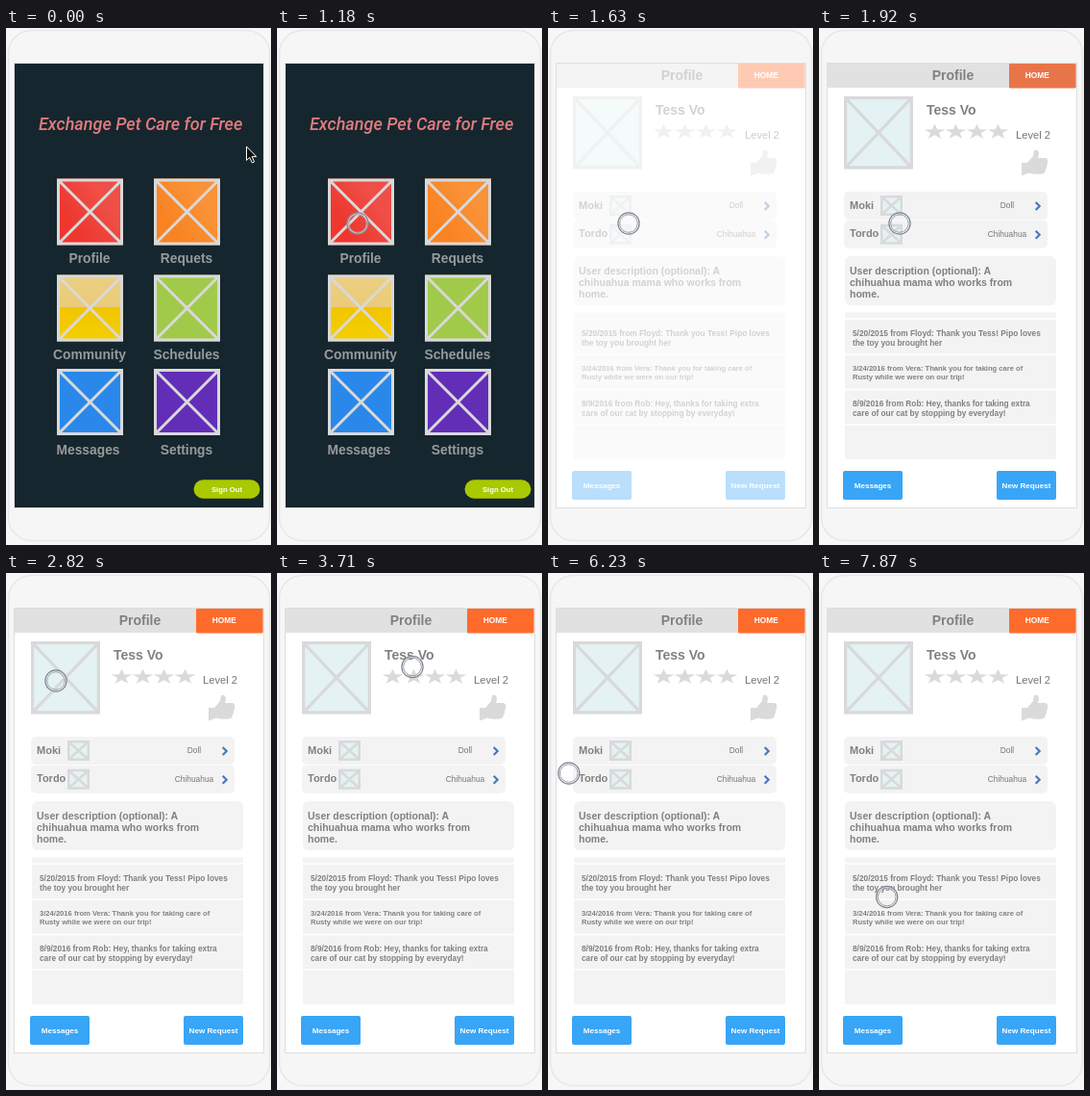
Recreate the animation shown at these times as an HTML page. Size 276 by 537 pixels, loop 8 s.

```html
<!DOCTYPE html>
<html lang="en">
<head>
<meta charset="utf-8">
<title>Pet care prototype</title>
<style>
  html, body { margin: 0; width: 100%; height: 100%; overflow: hidden; background: #f7f7f7; }
  svg { display: block; width: 100%; height: 100%; }
  text { font-family: "Liberation Sans", Arial, sans-serif; }
  .title { font: italic 500 18px Roboto, sans-serif; }
</style>
</head>
<body>
<svg id="stage" viewBox="0 0 276 537" xmlns="http://www.w3.org/2000/svg"></svg>
<script>
const LOOP = 8000, STEPS = 54;
const GREY = '#808080', PALE = '#f3f3f3', LINE = '#d9d9d9', BLUE = '#38a5f7';

const rect = (x, y, w, h, fill, r = 0, extra = '') =>
  `<rect x="${x}" y="${y}" width="${w}" height="${h}" rx="${r}" fill="${fill}" ${extra}/>`;

const label = (x, y, size, str, { fill = GREY, bold = true, anchor = 'start' } = {}) =>
  `<text x="${x}" y="${y}" font-size="${size}" fill="${fill}" text-anchor="${anchor}"
    font-weight="${bold ? 700 : 400}">${str}</text>`;

const centred = (x, y, size, str, fill = GREY, bold = true) =>
  label(x, y, size, str, { fill, bold, anchor: 'middle' });

// Crossed placeholder picture
const placeholder = (x, y, w, h, fill, line = 3) => {
  const i = line / 2;
  return rect(x, y, w, h, fill) +
    `<path d="M${x + i} ${y + i}h${w - line}v${h - line}h${line - w}zl${w - line} ${h - line}
      m0 ${line - h}L${x + i} ${y + h - i}" fill="none" stroke="${LINE}" stroke-width="${line}"/>`;
};

const button = (x, y, w, h, fill, r, str, size) =>
  rect(x, y, w, h, fill, r) + centred(x + w / 2, y + h / 2 + 3, size, str, '#fff');

const star = (cx, cy) => {
  const points = Array.from({ length: 10 }, (_, i) => {
    const a = i * Math.PI / 5, r = i % 2 ? 0.4 : 1;
    return [cx + 11.4 * r * Math.sin(a), cy - 8.3 * r * Math.cos(a)].map(v => v.toFixed(1));
  });
  return `<polygon points="${points.join(' ')}" fill="#dadada"/>`;
};

function homeScreen() {
  const tiles = [
    ['Profile', 'url(#red)'], ['Requets', 'url(#orange)'],
    ['Community', 'url(#sand)'], ['Schedules', '#a1ca4b'],
    ['Messages', '#2a88ea'], ['Settings', '#622eb8'],
  ];
  const rows = [156.5, 256.5, 354];
  return rect(9, 37, 259, 461, '#16262e') +
    `<text class="title" x="34" y="106" fill="#e27b7e">Exchange Pet Care for Free</text>` +
    tiles.map(([name, fill], i) => {
      const x = 53 + i % 2 * 101, y = rows[i >> 1];
      return placeholder(x, y, 69, 69, fill) +
        centred(x + (i === 4 ? 32.5 : 34), y + (i < 4 ? 87.5 : 89), 13.8, name, '#979a9b');
    }).join('') +
    button(195.5, 469.3, 69, 19.4, '#a9c900', 9.7, 'Sign Out', 7.7);
}

function petRow(y, name, breed) {
  return rect(26, y, 212, 29, PALE, 5) +
    label(32, y + 17.5, 11, name) +
    placeholder(64, y + 4, 23, 21, '#e4f2f4', 2.5) +
    centred(196, y + 17, 8.4, breed, '#777', false) +
    `<path d="M225.7 ${y + 11}l4 4l-4 4" fill="none" stroke="#4a78bd" stroke-width="2.2"/>`;
}

function profileScreen() {
  const lines = (x, y, size, gap, ...rows) =>
    rows.map((row, i) => label(x, y + i * gap, size, row)).join('');
  return rect(9, 37, 259, 461, '#fff') +
    rect(9, 37, 259, 25, '#e1e1e1') +
    centred(139.5, 54, 14, 'Profile') +
    rect(198, 37, 69.5, 25.5, '#ff6b2b', 1, 'id="homeButton"') +
    centred(227.3, 52, 8.4, 'HOME', '#fff') +
    placeholder(26, 71, 72, 75.5, '#e4f2f4', 3.2) +
    label(112, 90.2, 14, 'Tess Vo') +
    [0, 1, 2, 3].map(i => star(120.5 + 22 * i, 108)).join('') +
    label(205, 115, 11.2, 'Level 2', { fill: '#777', bold: false }) +
    `<path d="M211 140h6l6-7l1-6q5-1 5 4l-1 4h8q3 1 2 4q1 2-1 4q1 2-1 4q0 4-4 4.500
      q-8 1-13-1l-8 3z" fill="#dadada"/>` +
    petRow(170, 'Moki', 'Doll') +
    petRow(199.7, 'Tordo', 'Chihuahua') +
    rect(27, 237, 220, 51, PALE, 6) +
    lines(32, 256, 10.5, 11.8, 'User description (optional): A',
      'chihuahua mama who works from', 'home.') +
    rect(27, 295.5, 220, 152.5, PALE) +
    [302, 339, 375.5, 412].map(y => rect(27, y - 0.8, 220, 1.6, '#fff')).join('') +
    lines(35, 320, 8.3, 10, '5/20/2015 from Floyd: Thank you Tess! Pipo loves', 'the toy you brought her') +
    lines(35, 356, 7.6, 9, '3/24/2016 from Vera: Thank you for taking care of', 'Rusty while we were on our trip!') +
    lines(35, 393, 8.3, 10, '8/9/2016 from Rob: Hey, thanks for taking extra', 'care of our cat by stopping by everyday!') +
    button(25, 460, 62, 30, BLUE, 2, 'Messages', 8.1) +
    button(185, 460, 62, 30, BLUE, 2, 'New Request', 8.1);
}

const tileGradient = (id, from, to) =>
  `<linearGradient id="${id}" x1="0" y1="1" x2="1" y2="0.3">
    <stop offset="0.3" stop-color="${from}"/><stop offset="0.8" stop-color="${to}"/>
  </linearGradient>`;

document.getElementById('stage').innerHTML = `
  <defs>
    ${tileGradient('red', '#ed372f', '#ef4f47')}
    ${tileGradient('orange', '#f98322', '#fa9238')}
    <linearGradient id="sand" x2="0" y2="1">
      <stop stop-color="#ebcf83"/><stop offset="0.49" stop-color="#ebcb78"/>
      <stop offset="0.49" stop-color="#f1c500"/><stop offset="1" stop-color="#f4cf00"/>
    </linearGradient>
  </defs>
  ${rect(0, 0, 276, 537, '#f7f7f7')}
  ${rect(2.5, 2.5, 272, 530, '#f6f6f6', 24, 'stroke="#e7e7e7" stroke-width="1.5"')}
  ${rect(8.5, 36.5, 260, 462, '#fff', 0, 'stroke="#dedede"')}
  <g id="home">${homeScreen()}</g>
  <rect id="veil" x="9" y="37" width="259" height="461" fill="#fff"/>
  <g id="profile">${profileScreen()}</g>
  <path id="arrow" d="M250.500 123v14.500l3.300-3l2.500 5.500l2.300-1l-2.400-5.400h4.600z" fill="#111" stroke="#fff"/>
  <g id="ring" fill="none">
    <circle r="10.200" stroke="#fff" stroke-opacity="0.6" stroke-width="2"/>
    <circle r="11.100" stroke="#7f858f" stroke-width="1.200"/>
    <circle r="9.300" stroke="#989da6"/>
  </g>`;

// Pointer path: [step, x, y]
const path = [
  [0, 250, 128], [1, 238, 136], [4, 150, 172], [6, 76, 206], [8, 84, 203], [17, 84, 203],
  [18, 70, 170], [19, 52, 112], [20, 62, 78], [21, 110, 71], [23, 215, 92], [25, 141, 97.5],
  [27, 196, 108], [30, 86, 112], [32, 99, 132], [34, 99.7, 133],
  [36, 49, 184], [38, 160, 184], [39, 194, 205], [40, 160, 230], [41, 110, 205],
  [42, 21.7, 208], [43, 50, 188], [45, 162, 240], [47, 70, 280], [49, 22, 305],
  [51, 138, 318], [53, 70.7, 336.5],
];

function pointerAt(step) {
  const i = Math.max(1, path.findIndex(p => p[0] >= step));
  const [s0, x0, y0] = path[i - 1], [s1, x1, y1] = path[i];
  const k = (step - s0) / (s1 - s0);
  return [x0 + (x1 - x0) * k, y0 + (y1 - y0) * k];
}

const [home, veil, profile, homeButton, arrow, ring] =
  ['home', 'veil', 'profile', 'homeButton', 'arrow', 'ring'].map(id => document.getElementById(id));
const show = (el, alpha) => el.setAttribute('opacity', alpha);

function draw() {
  const t = performance.now() % LOOP;
  const step = Math.min(STEPS - 1, Math.floor((t + 8) * STEPS / LOOP));
  const fade = { 11: 0.35, 12: 0.75 };
  show(home, step < 13 ? 1 : 0);
  show(veil, step < 10 ? 0 : step === 10 ? 0.75 : 1);
  show(profile, step < 11 ? 0 : fade[step] ?? 1);
  homeButton.setAttribute('fill', step === 13 ? '#e8754a' : '#ff6b2b');
  show(arrow, step === 0 ? 1 : 0);
  show(ring, step === 0 ? 0 : 1);
  ring.setAttribute('transform', `translate(${pointerAt(step)})`);
  requestAnimationFrame(draw);
}
draw();
</script>
</body>
</html>
```
